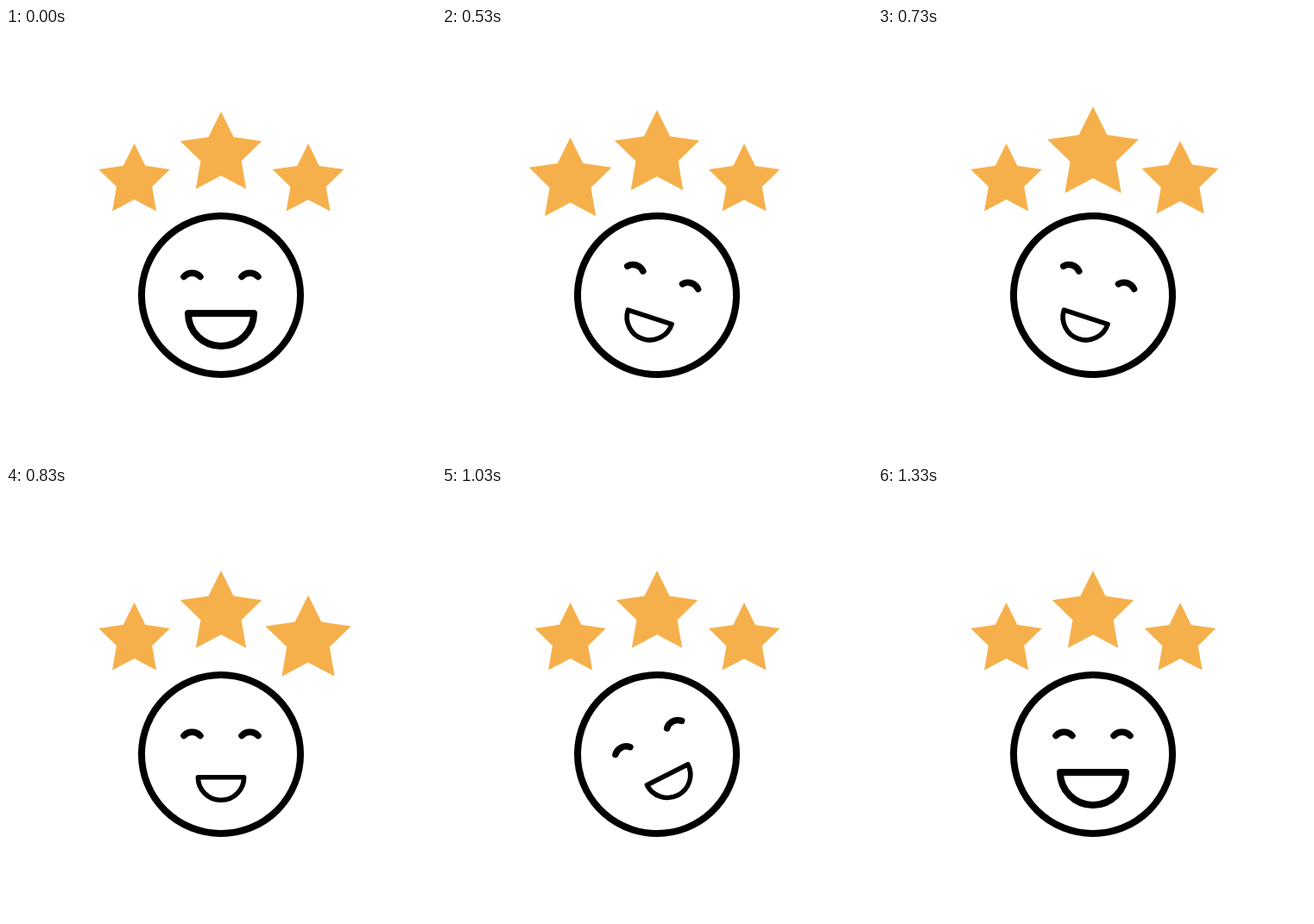
Animation, 498 px wide and 500 px high, one loop 2010 ms. Source, as an HTML page:

```html
<!DOCTYPE html>
<html>
<head>
<meta charset="utf-8">
<style>
  html, body { margin: 0; height: 100%; overflow: hidden; background: #fff; }
  svg { display: block; width: 100vw; height: 100vh; }
</style>
</head>
<body>
<svg viewBox="0 0 498 500">
  <g id="stars" fill="#f6b04b"></g>
  <g id="face" fill="none" stroke="#000" stroke-width="8" stroke-linecap="round" stroke-linejoin="round">
    <circle cx="249" cy="310" r="92"/>
    <path d="M206 288.5a12.8 12.8 0 0 1 19 0M273 288.5a12.8 12.8 0 0 1 19 0" stroke-width="7.5"/>
    <path id="mouth" d="M211 331H287A38 38 0 0 1 211 331Z"/>
  </g>
</svg>
<script>
const LOOP = 2010;
const get = id => document.getElementById(id);
const face = get('face'), mouth = get('mouth');

// x, y, radius, frame at which the pulse peaks
const stars = [
  [148.6, 177.4, 43.4, 15],
  [249, 146.5, 49.6, 20],
  [350, 177.5, 43.4, 25]
].map(([x, y, r, peak]) => {
  const points = Array.from({ length: 10 }, (_, i) => {
    const a = i * Math.PI / 5, d = i % 2 ? r / 2 : r;
    return [d * Math.sin(a), -d * Math.cos(a)];
  });
  const el = document.createElementNS('http://www.w3.org/2000/svg', 'polygon');
  el.setAttribute('points', points.join(' '));
  get('stars').append(el);
  return { el, x, y, peak };
});

// Linear interpolation through [frame, value] keys
function track(keys, n) {
  if (n <= keys[0][0]) return keys[0][1];
  for (let i = 1; i < keys.length; i++) {
    const [t0, v0] = keys[i - 1], [t1, v1] = keys[i];
    if (n <= t1) return v0 + (v1 - v0) * (n - t0) / (t1 - t0);
  }
  return keys[keys.length - 1][1];
}

const tilt = [[10, 0], [20, 30], [30, -30], [40, 0]];
const squeeze = [[10, 1], [15, 0.7], [35, 0.7], [40, 1]];

function draw() {
  // 30 steps per second, with step times rounded to 10 ms
  const n = Math.floor(Math.floor(performance.now() % LOOP / 10) * 0.3 + 0.11);
  for (const { el, x, y, peak } of stars) {
    const scale = 1 + 0.2 * Math.max(0, 1 - Math.abs(n - peak) / 5);
    el.setAttribute('transform', `translate(${x} ${y}) scale(${scale})`);
  }
  face.setAttribute('transform', `rotate(${track(tilt, n)} 249 310)`);
  mouth.setAttribute('transform', `translate(249 350) scale(${track(squeeze, n)}) translate(-249 -350)`);
  requestAnimationFrame(draw);
}
draw();
</script>
</body>
</html>
```
